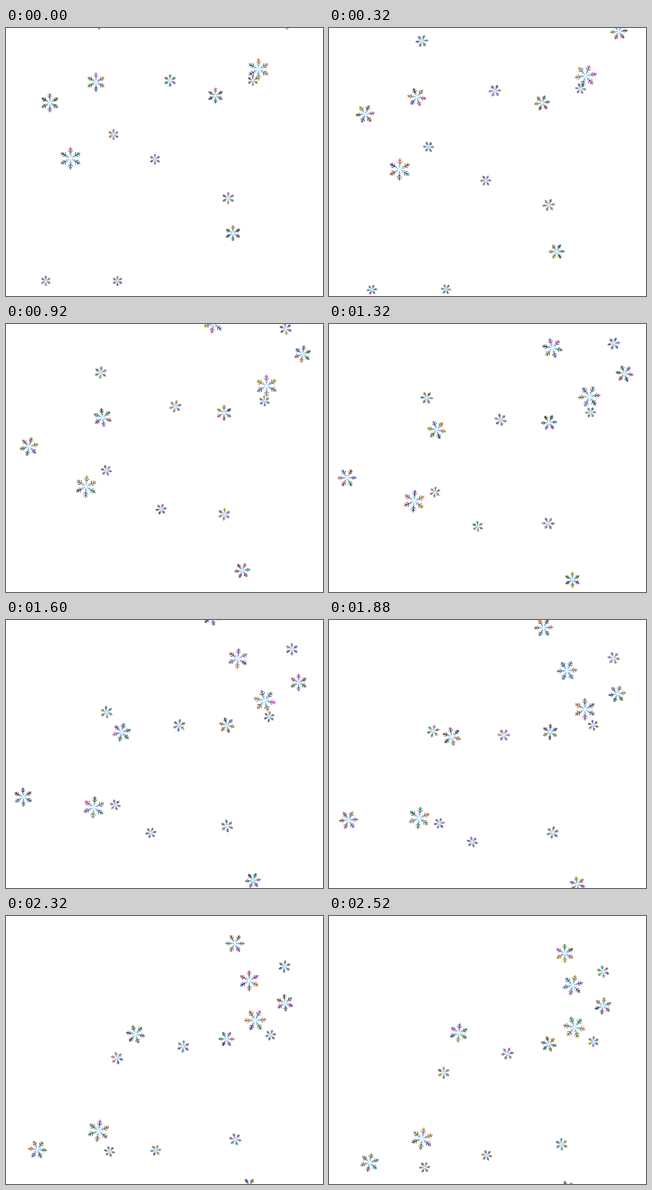
Write an HTML page with a canvas that moves like this. It is 398 px wide and 337 px high and loops after 2.56 s.

```html
<!DOCTYPE html>
<html lang="en">
<head>
<meta charset="utf-8">
<title>Snowfall</title>
<style>
html, body { margin: 0; width: 100%; height: 100%; overflow: hidden; background: #fff; }
canvas { display: block; }
</style>
</head>
<body>
<canvas id="sky" width="398" height="337"></canvas>
<script>
const ctx = document.getElementById('sky').getContext('2d');
const STEP = 40, STEPS = 64;
const DARK = ['#7d3c9e', '#968a22', '#2c7580', '#2b3d70', '#b3743a', '#3a3b42', '#3c7445', '#b545ad', '#4b74a8', '#8c4a35'];
const PALE = ['#6fb2d6', '#75a9c9', '#8fbfe0', '#6f8fd0', '#7cc0c4'];
const flakes = [];

// Radius, degrees turned per step, and a few points passed at even intervals
function flake(r, spin, path) {
  const points = path.split(' ').map(p => p.split(',').map(Number));
  flakes.push({ r, spin, x: points.map(p => p[0]), y: points.map(p => p[1]) });
}

// Polynomial through evenly timed values, with t running from 0 to 1
function along(values, t) {
  const n = values.length - 1, v = [...values];
  for (let d = 1; d <= n; d++) {
    for (let i = 0; i + d <= n; i++) v[i] += (v[i + 1] - v[i]) * (t * n - i) / d;
  }
  return v[0];
}

flake(12, -4.56, '55,94 31,147 22,231 51,310');
flake(12, 4.85, '113,68 119,114 148,143 163,147');
flake(14, 0.15, '81,164 106,220 117,280');
flake(7, -3.4, '135,134 125,179 138,239 120,316');
flake(8, 3.2, '206,66 215,118 224,173');
flake(10, 2.6, '263,85 276,122 276,161');
flake(14, 2.55, '317,52 327,89 308,140');
flake(7, -2.8, '310,66 328,109 332,158');
flake(7, 3.5, '187,165 196,228 181,271 198,301');
flake(8, 2.8, '279,214 275,249 292,287');
flake(10, 3.6, '285,258 295,307 311,329 298,343');
flake(6.5, 3, '50,318 80,406');
flake(6.5, -3, '140,318 195,400');
flake(8, 2.86, '117,-6 122,88 144,197');
flake(11, 3, '353,-9 372,33 366,83 344,113');
flake(13, 3.1, '193,-96 278,26 306,87');
flake(8, -3, '315,-44 357,22 344,70');
flake(12, 5.7, '205,-60 246,-20 296,47');

function noise(n) {
  const s = Math.sin(n * 12.9898) * 43758.5453;
  return s - Math.floor(s);
}

function line(color, x1, y1, x2, y2) {
  ctx.strokeStyle = color;
  ctx.beginPath();
  ctx.moveTo(x1, y1);
  ctx.lineTo(x2, y2);
  ctx.stroke();
}

function drawFlake({ r, spin, x, y }, id, step) {
  const t = step / (STEPS - 1), big = r > 9;
  let seed = id * 131 + step * 37.7;
  const pick = list => list[Math.floor(noise(++seed) * list.length)];
  ctx.save();
  ctx.translate(along(x, t), along(y, t));
  ctx.rotate(spin * step * Math.PI / 180);
  for (let arm = 0; arm < 6; arm++) {
    const main = pick(DARK);
    ctx.lineWidth = big ? 0.9 : 0.7;
    line(pick(PALE), 0, -r * 0.12, 0, -r * 0.5);
    for (const side of [-1, 1]) {
      line(pick(PALE), 0, -r * 0.3, side * r * 0.13, -r * 0.42);
      line(pick(DARK), 0, -r * 0.5, side * r * 0.23, -r * 0.7);
      line(noise(++seed) < 0.5 ? main : pick(DARK), 0, -r * 0.7, side * r * 0.16, -r * 0.88);
    }
    ctx.lineWidth = big ? 1.25 : 0.85;
    line(main, 0, -r * 0.48, 0, -r);
    ctx.rotate(Math.PI / 3);
  }
  ctx.restore();
}

const start = performance.now();
function tick() {
  const step = Math.floor((performance.now() - start) / STEP) % STEPS;
  ctx.fillStyle = '#fff';
  ctx.fillRect(0, 0, 398, 337);
  flakes.forEach((f, id) => drawFlake(f, id, step));
  requestAnimationFrame(tick);
}
tick();
</script>
</body>
</html>
```
